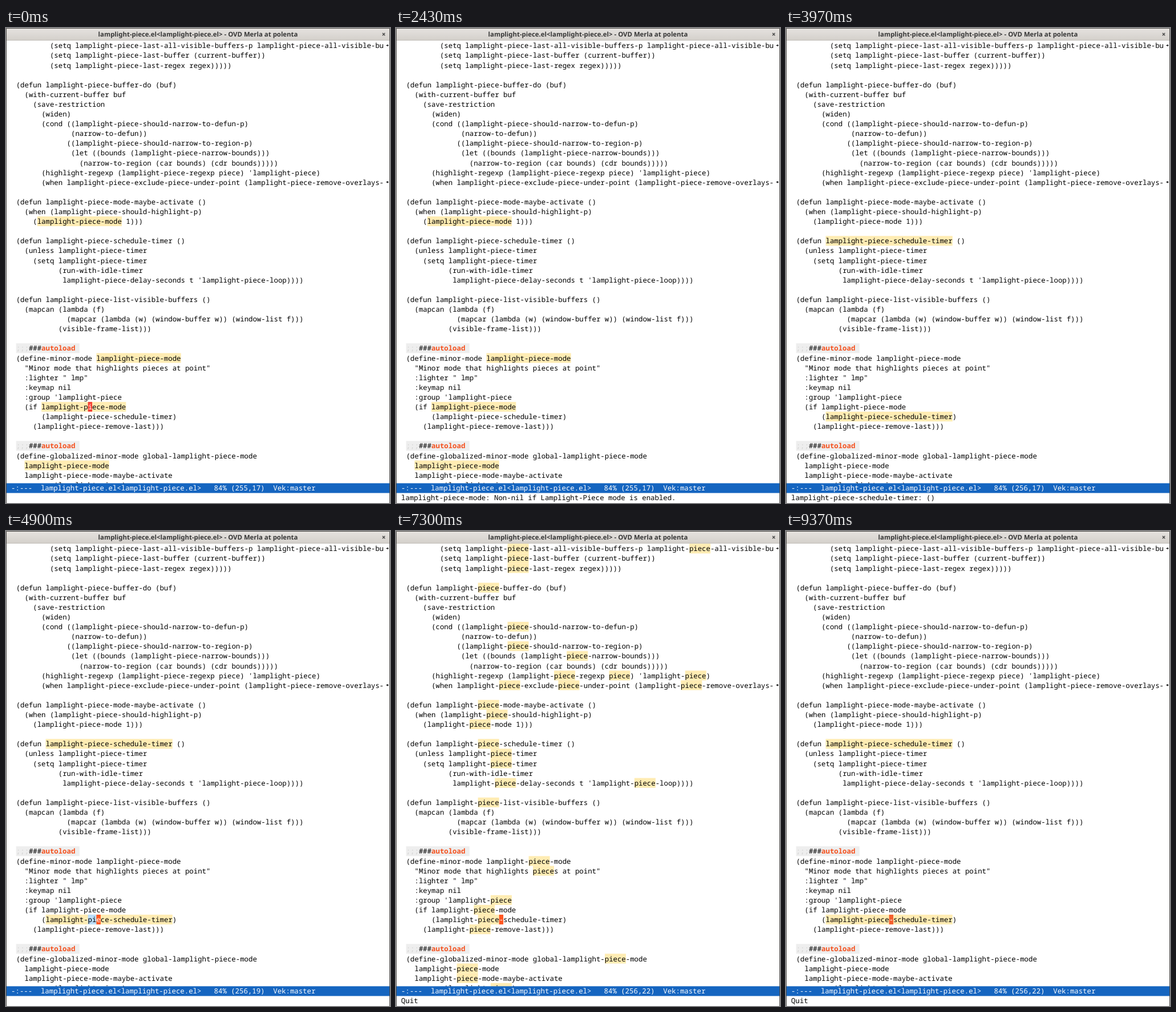
These frames come from a looping animation (673 px wide and 832 px high, 9500 ms). An HTML page:

```html
<!DOCTYPE html>
<html lang="en">
<head>
<meta charset="utf-8">
<title>Editor</title>
<style>
  html, body { margin: 0; width: 100%; height: 100%; overflow: hidden; background: #fff; }
  svg { display: block; width: 673px; height: 832px; }
  text { font: 12.35px "Noto Sans Mono", monospace; white-space: pre; text-rendering: geometricPrecision; }
  .title { font: bold 11.4px "Noto Sans", "Open Sans", sans-serif; fill: #363636; text-anchor: middle; }
  .dim { fill: #d2d2d2; }
  .key { fill: #f4511e; font-weight: bold; }
</style>
</head>
<body>
<svg viewBox="0 0 673 832">
  <defs>
    <linearGradient id="bar" x2="0" y2="1">
      <stop stop-color="#e6e3e0"/><stop offset="1" stop-color="#d3cfca"/>
    </linearGradient>
    <path id="arrow" d="M-2.3 -.6h2v-1.5l2.5 2.1l-2.5 2.1v-1.5h-2z"/>
  </defs>
  <rect width="673" height="832" fill="#fff"/>
  <g id="marks"></g>
  <g id="code"></g>
  <g id="caret"></g>
  <use href="#arrow" x="668.6" y="30.5"/>
  <use href="#arrow" x="668.6" y="269.9"/>
  <rect y="797.4" width="673" height="17.1" fill="#1565c0"/>
  <g id="status"></g>
  <rect width="673" height="22" fill="url(#bar)"/>
  <path d="M0 21.5H673" stroke="#c2beb9"/>
  <text class="title" x="336.5" y="15.3">lamplight-piece.el&lt;lamplight-piece.el&gt; - OVD Merla at polenta</text>
  <path d="M659.8 8.8l4.4 4.4m0 -4.4l-4.4 4.4" stroke="#444" stroke-width="1.3"/>
  <path d="M.5 832V.5H672.5V832" fill="none" stroke="#4a4846"/>
</svg>
<script>
const LINES = `        (setq lamplight-piece-last-all-visible-buffers-p lamplight-piece-all-visible-bu
        (setq lamplight-piece-last-buffer (current-buffer))
        (setq lamplight-piece-last-regex regex)))))

(defun lamplight-piece-buffer-do (buf)
  (with-current-buffer buf
    (save-restriction
      (widen)
      (cond ((lamplight-piece-should-narrow-to-defun-p)
             (narrow-to-defun))
            ((lamplight-piece-should-narrow-to-region-p)
             (let ((bounds (lamplight-piece-narrow-bounds)))
               (narrow-to-region (car bounds) (cdr bounds)))))
      (highlight-regexp (lamplight-piece-regexp piece) 'lamplight-piece)
      (when lamplight-piece-exclude-piece-under-point (lamplight-piece-remove-overlays-

(defun lamplight-piece-mode-maybe-activate ()
  (when (lamplight-piece-should-highlight-p)
    (lamplight-piece-mode 1)))

(defun lamplight-piece-schedule-timer ()
  (unless lamplight-piece-timer
    (setq lamplight-piece-timer
          (run-with-idle-timer
           lamplight-piece-delay-seconds t 'lamplight-piece-loop))))

(defun lamplight-piece-list-visible-buffers ()
  (mapcan (lambda (f)
            (mapcar (lambda (w) (window-buffer w)) (window-list f)))
          (visible-frame-list)))

;;;###autoload
(define-minor-mode lamplight-piece-mode
  "Minor mode that highlights pieces at point"
  :lighter " lmp"
  :keymap nil
  :group 'lamplight-piece
  (if lamplight-piece-mode
      (lamplight-piece-schedule-timer)
    (lamplight-piece-remove-last)))

;;;###autoload
(define-globalized-minor-mode global-lamplight-piece-mode
  lamplight-piece-mode
  lamplight-piece-mode-maybe-activate
  :group 'lamplight-piece)`.split("\n");

const X0 = 17.67, Y0 = 22.23, CW = 7.41, LH = 17.1, ASCENT = 13.11;
const LOOP = 9500, MARK_COL = 17, LINE_OFFSET = 218;
const YELLOW = "#ffecb3", BLUE = "#bbdefb";

const symbol = s => new RegExp(`(?<![\\w-])${s}(?![\\w-])`, "g");
const MODE = symbol("lamplight-piece-mode");
const TIMER = symbol("lamplight-piece-schedule-timer");
const WORD = /piece/g;
const TIMER_DOC = "lamplight-piece-schedule-timer: ()";
const MODE_DOC = "lamplight-piece-mode: Non-nil if Lamplight-Piece mode is enabled.";

// Each step changes only the listed parts of the state.
const STEPS = [
  [0, { row: 37, col: 17, find: MODE, caret: "#f44336", echo: "", region: false }],
  [430, { row: 38 }],
  [630, { find: TIMER }],
  [1230, { caret: "", echo: TIMER_DOC }],
  [1500, { row: 37, caret: "#f44336" }],
  [2170, { find: MODE }],
  [2430, { caret: "", echo: MODE_DOC }],
  [3100, { row: 38, caret: "#f44336" }],
  [3500, { find: TIMER }],
  [3970, { caret: "", echo: TIMER_DOC }],
  [4700, { caret: "#ff5722", echo: "Mark set" }],
  [4900, { col: 19, region: true, echo: "" }],
  [5100, { col: 22 }],
  [5770, { find: WORD }],
  [6230, { caret: "" }],
  [6970, { caret: "#ff5722" }],
  [7300, { region: false, echo: "Quit" }],
  [8170, { find: TIMER, caret: "" }],
  [9370, { caret: "#f4602f" }]
];

const $ = id => document.getElementById(id);
const esc = s => s.replace(/</g, "&lt;").replace(/>/g, "&gt;");
const xAt = col => X0 + col * CW;
const yAt = row => Y0 + row * LH;
const cells = (row, col, n, fill) =>
  `<rect x="${xAt(col)}" y="${yAt(row)}" width="${n * CW}" height="${LH}" fill="${fill}"/>`;
const text = (x, top, body, fill = "#000") =>
  `<text x="${x}" y="${top + ASCENT}" fill="${fill}">${body}</text>`;

const isCookie = s => s.startsWith(";;;");
const cookie = '<tspan class="dim">;;;</tspan>###<tspan class="key">autoload</tspan>';

$("code").innerHTML = LINES.map((s, row) => {
  const body = s.trimStart();
  return text(xAt(s.length - body.length), yAt(row), isCookie(s) ? cookie : esc(body));
}).join("");

function draw(s) {
  let marks = "";
  LINES.forEach((line, row) => {
    if (isCookie(line)) marks += cells(row, 0, 15, "#eee");
    for (const m of line.matchAll(s.find)) marks += cells(row, m.index, m[0].length, YELLOW);
  });
  if (s.region) marks += cells(s.row, MARK_COL, s.col - MARK_COL, BLUE);
  $("marks").innerHTML = marks;

  $("caret").innerHTML = s.caret && cells(s.row, s.col, 1, s.caret) +
    text(xAt(s.col), yAt(s.row), LINES[s.row][s.col], "#fff");

  const file = "lamplight-piece.el";
  const info = `-:---  ${file}<${file}>   84% (${s.row + LINE_OFFSET},${s.col})  Vek:master`;
  $("status").innerHTML = text(9.1, 797.2, esc(info), "#fff") + text(9.1, 814.3, s.echo);
}

let shown = -1;
function tick(now) {
  const t = now % LOOP;
  const step = STEPS.findLastIndex(([at]) => at <= t);
  if (step !== shown) {
    shown = step;
    draw(Object.assign({}, ...STEPS.slice(0, step + 1).map(([, change]) => change)));
  }
  requestAnimationFrame(tick);
}
tick(0);
</script>
</body>
</html>
```
